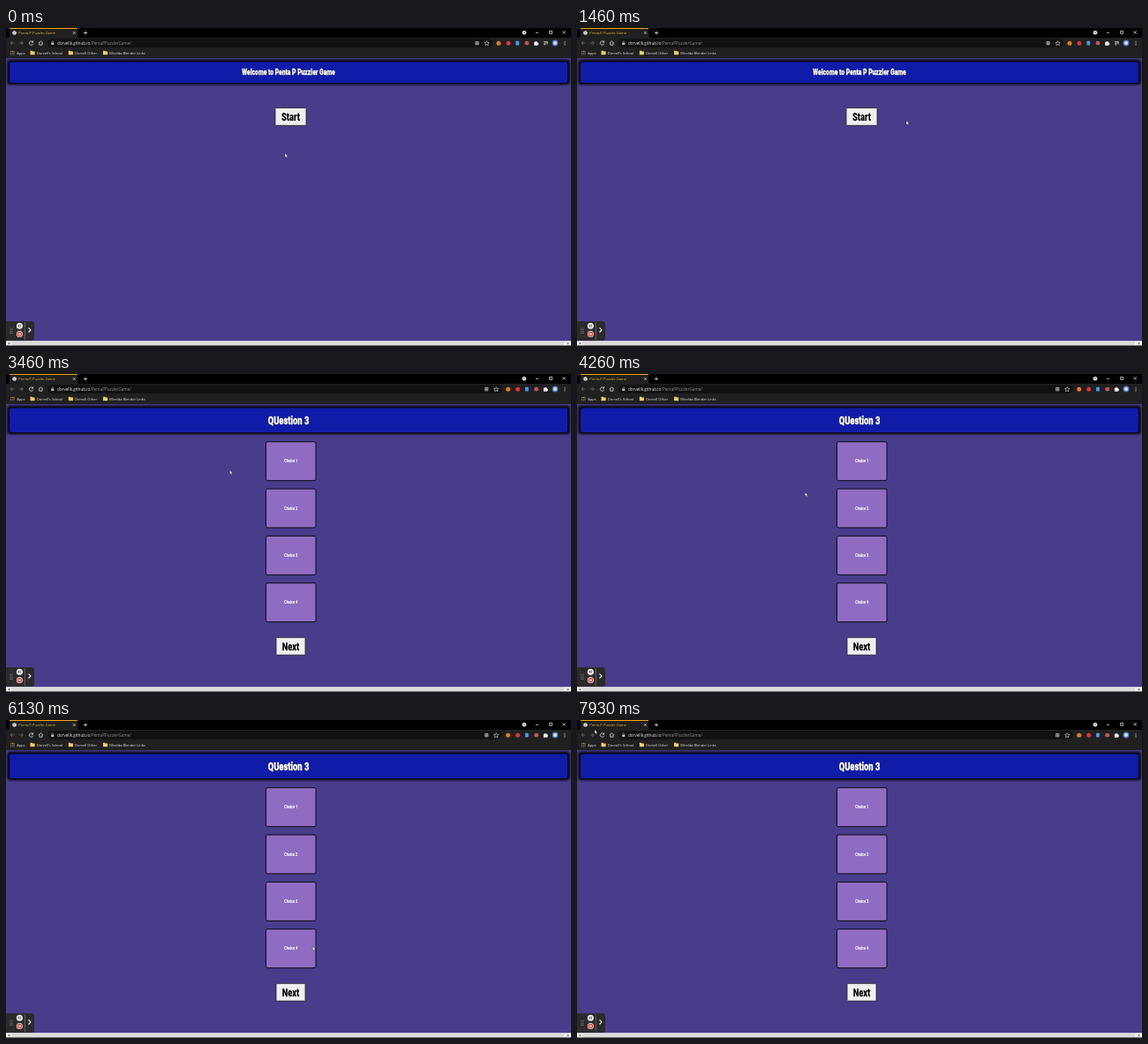
An HTML page for the animation above (8000 ms loop, 640 by 360 pixels).

```html
<!DOCTYPE html>
<html lang="en">
<head>
<meta charset="utf-8">
<title>Quiz demo</title>
<style>
  html, body { margin: 0; width: 100%; height: 100%; overflow: hidden; background: #483d8b; }
  svg { display: block; width: 100vw; height: 100vh; }
  text { font-family: "Open Sans", "Noto Sans", sans-serif; font-size: 4px; fill: #e4e4e4; }
  .heavy { font-family: Roboto, Inter, sans-serif; font-weight: 900; text-anchor: middle; }
  .title { fill: #fff; stroke: #fff; stroke-width: .35px; filter: drop-shadow(.5px .6px .5px #000); }
  .soft { filter: blur(1.4px); }
  .line { fill: none; stroke: #ddd; stroke-width: .8; }
  .dim { stroke: #707070; }
</style>
</head>
<body>
<svg id="stage" viewBox="0 0 640 360" preserveAspectRatio="none">
  <rect width="640" height="360" fill="#483d8b"/>
  <g id="start"></g>
  <g id="quiz"></g>

  <g id="browser">
    <rect width="640" height="34" fill="#202020"/>
    <rect width="640" height="11" fill="#000"/>
    <path d="M2 11Q4 11 4 8V2Q4 0 6 0H79Q81 0 81 2V8Q81 11 83 11Z" fill="#202020"/>
    <rect x="4" width="77" height="1" fill="#f0a800"/>
    <circle cx="9.5" cy="5.5" r="2.3" fill="#e8e8e8"/>
    <path class="line" d="M8 4.5L9.5 5.5L9 7M10 3.7L11 5" style="stroke:#555;stroke-width:.5"/>
    <text x="14.3" y="7" style="fill:#eab62c">Penta-P-Puzzler-Game</text>
    <path class="line" d="M76 4.2l2.6 2.6m0-2.6l-2.6 2.6M88 5.5h4m-2-2v4"/>
    <circle cx="587" cy="5.3" r="2.3" fill="#eee"/>
    <path d="M586 4.8h2l-1 1.3z" fill="#111"/>
    <path class="line" d="M600 5.3h3.2M615.6 3.4h3v3h-3zM630.7 3.3l3.2 3.2m0-3.2l-3.2 3.2"/>

    <path class="line dim" d="M9.5 17H5.2m2-2l-2 2 2 2M15 17h4.3m-2-2l2 2-2 2"/>
    <path class="line" d="M30.3 15.7A2.2 2.2 0 1 0 30.7 17.7M30.6 14.4v1.8h-1.8M37 17l2.4-2.2 2.4 2.2M37.8 16.6v2.6h3.2v-2.6"/>
    <rect id="address" x="47" y="12.3" height="9.6" rx="4.8" fill="#111"/>
    <rect x="51.2" y="16.6" width="3.1" height="2.4" fill="#bbb"/>
    <path class="line" d="M51.9 16.6v-.8a.9.9 0 0 1 1.8 0v.8" style="stroke:#bbb;stroke-width:.5"/>
    <text x="58" y="18.9" style="font-size:4.6px">dorvellk.github.io<tspan fill="#8d8d8d">/PentaPPuzzlerGame/</tspan></text>

    <g id="tools">
      <path class="line" d="M531.9 15.5h3.4v3.4h-3.4zM531.9 17.2h3.4M533.6 15.5v3.4" style="stroke-width:.6"/>
      <path class="line" d="M544.6 14.7l.8 1.7 1.9.2-1.4 1.3.4 1.9-1.7-1-1.7 1 .4-1.9-1.4-1.3 1.9-.2z" style="stroke-width:.6"/>
      <circle cx="558" cy="17.2" r="2.5" fill="#e07a24"/>
      <circle cx="569" cy="17.2" r="2.5" fill="#d8363c"/>
      <rect x="577.4" y="14.8" width="3.8" height="4.6" rx=".6" fill="#4a9bea"/>
      <circle cx="590" cy="17.2" r="2.4" fill="#c2575b"/>
      <path d="M598.2 15.8h1.3a.9.9 0 0 1 1.8 0h1.2v1.2a.9.9 0 0 1 0 1.8v1h-4.3z" fill="#eee"/>
    </g>
    <path id="media" class="line" d="M609 15.6h4M609 17.2h3M609 18.8h2M613 18.8v-2.8h1"/>
    <circle cx="622" cy="17" r="3.4" fill="#4d80c8"/>
    <circle cx="622" cy="17" r="2" fill="#d7e3f2"/>
    <g id="more" fill="#ddd"></g>

    <g id="apps"></g>
    <text x="12.3" y="29.5">Apps</text>
    <g id="folders"></g>
  </g>

  <g id="scrollbar">
    <rect y="354.2" width="640" height="5.8" fill="#f1f1f1"/>
    <rect x="6" y="355" width="626" height="4" fill="#dcdcdc"/>
    <path d="M4 355.8v2.6l-1.6-1.3zM636 355.8v2.6l1.6-1.3z" fill="#444"/>
    <rect y="359.3" width="640" height=".7" fill="#333"/>
  </g>

  <g id="recorder">
    <path d="M0 332H29Q32 332 32 335V351Q32 354 29 354H0Z" fill="#2b2b2d"/>
    <g id="grip" fill="#8a8a8a"></g>
    <circle cx="15.4" cy="337.2" r="3.5" fill="#f2f2f2"/>
    <path d="M14.5 335.7v3M16.3 335.7v3" stroke="#333" stroke-width=".8"/>
    <circle cx="15.4" cy="346.6" r="3.5" fill="#f2f2f2"/>
    <circle cx="15.4" cy="346.6" r="2.8" fill="#dc3a32"/>
    <rect x="14.3" y="345.5" width="2.2" height="2.2" fill="#fff"/>
    <path d="M21.3 333v20" stroke="#77777a" stroke-width=".7"/>
    <path d="M25.5 339.3l2.5 2.6-2.5 2.6" fill="none" stroke="#fff" stroke-width="1.1"/>
  </g>

  <circle id="ripple" r="10" fill="#d01830" fill-opacity=".14" stroke="#c81e38" stroke-opacity=".75" stroke-width=".8"/>
  <path id="cursor" d="M0 0V4.5L1.1 3.5 1.9 5.2 2.7 4.8 1.9 3.2H3.3Z" fill="#fff" stroke="#111" stroke-width=".35"/>
</svg>
<script>
const $ = id => document.getElementById(id);
const LOOP = 8000, STEP = 1000 / 15;
const CLICK = 2270, OPEN = 2530, TOOLS = 1930;

const heavy = (s, x, y, size, fill, cls = "") =>
  `<g transform="translate(${x} ${y}) scale(.75 1)"><text class="heavy ${cls}" style="font-size:${size}px;fill:${fill}">${s}</text></g>`;

const banner = (h, s, y, size) => `
  <rect class="soft" x="1.5" y="36" width="637" height="${h + 4.5}" rx="3"/>
  <rect x="4" y="38.5" width="632" height="${h}" rx="2" fill="#101ca8"/>
  ${heavy(s, 320, y, size, "#fff", "title")}`;

const button = (x, y, w, s, id) => `
  <rect id="${id}Box" x="${x}" y="${y}" width="${w}" height="19.8" rx=".7" fill="#efefef" stroke="#222" stroke-width=".8"/>
  <g id="${id}Text">${heavy(s, 322.5, y + 14.4, 12.4, "inherit")}</g>`;

$("start").innerHTML = banner(23.5, "Welcome to Penta P Puzzler Game", 53.2, 9)
  + `<rect id="glow" class="soft" x="303" y="88.5" width="39" height="23.5" rx="2" fill="#71d25a"/>`
  + button(305, 90.5, 35, "Start", "go");

$("quiz").innerHTML = banner(27.5, "QUestion 3", 56.6, 12.5)
  + [0, 1, 2, 3].map(i => {
    const y = 76.7 + i * 53.33;
    return `<rect x="294.4" y="${y}" width="56.6" height="44" rx="2" fill="#8f6cc1" stroke="#0c0814"/>`
      + heavy(`Choice ${i + 1}`, 322.7, y + 23.6, 5, "#fff");
  }).join("") + button(306, 298.3, 33, "Next", "next");

const dots = (n, cols, x, y, dx, dy, r, fill) => Array.from({ length: n }, (_, i) =>
  `<circle cx="${x + i % cols * dx}" cy="${y + Math.floor(i / cols) * dy}" r="${r}" ${fill ? `fill="${fill(i)}"` : ""}/>`).join("");
const hues = ["#e05245", "#e6b43c", "#53a866", "#5793e6"];
$("apps").innerHTML = dots(9, 3, 5.6, 26.4, 1.7, 1.7, .6, i => hues[i % 4]);
$("more").innerHTML = dots(3, 1, 633, 15.3, 0, 1.8, .55);
$("grip").innerHTML = dots(8, 2, 5, 340, 2, 1.8, .55);
$("folders").innerHTML = [[27.5, "Dorvell's School"], [70.8, "Dorvell Other"], [110, "Mirelda Blender Links"]].map(([x, s]) =>
  `<path d="M${x} 25.8h2l.7.8h2.4v3.6h-5.1z" fill="#f5cf60"/><text x="${x + 7.3}" y="29.5">${s}</text>`).join("");

// time, x, y of the pointer tip
const path = [
  [0, 316, 142], [400, 316, 142], [1250, 373, 105], [1650, 373, 105],
  [2150, 327, 95], [2600, 327, 95], [3250, 253.5, 109], [3650, 253.5, 109],
  [5060, 268, 184.5], [5300, 268, 184.5], [6050, 347.3, 256.5],
  [6450, 347.3, 256.5], [7800, 20, 11], [LOOP, 20, 11]
];

function pointer(t) {
  const i = path.findIndex(p => p[0] > t);
  const [t0, x0, y0] = path[i - 1], [t1, x1, y1] = path[i];
  const k = (1 - Math.cos(Math.PI * (t - t0) / (t1 - t0))) / 2;
  return [x0 + (x1 - x0) * k, y0 + (y1 - y0) * k];
}

const show = (id, on) => $(id).setAttribute("visibility", on ? "visible" : "hidden");

function draw(t) {
  const [x, y] = pointer(t);
  const opened = t >= OPEN, late = t >= TOOLS;
  const hover = !opened && x > 305 && x < 340 && y > 90 && y < 110;
  $("start").style.display = opened ? "none" : "";
  $("quiz").style.display = opened ? "" : "none";
  show("glow", hover);
  $("goBox").setAttribute("fill", hover ? "#000" : "#efefef");
  $("goText").style.fill = hover ? "#fff" : "#000";
  $("address").setAttribute("width", late ? 515 : 504);
  $("tools").setAttribute("transform", `translate(${late ? 10.7 : 0})`);
  show("media", !late);
  show("ripple", t >= CLICK && t < OPEN);
  $("ripple").setAttribute("transform", `translate(${x} ${y + 1})`);
  $("cursor").setAttribute("transform", `translate(${x} ${y})`);
}

function tick() {
  const t = performance.now() % LOOP;
  draw(Math.min(Math.floor((t + 5) / STEP) * STEP, LOOP - STEP));
  requestAnimationFrame(tick);
}
tick();
</script>
</body>
</html>
```
